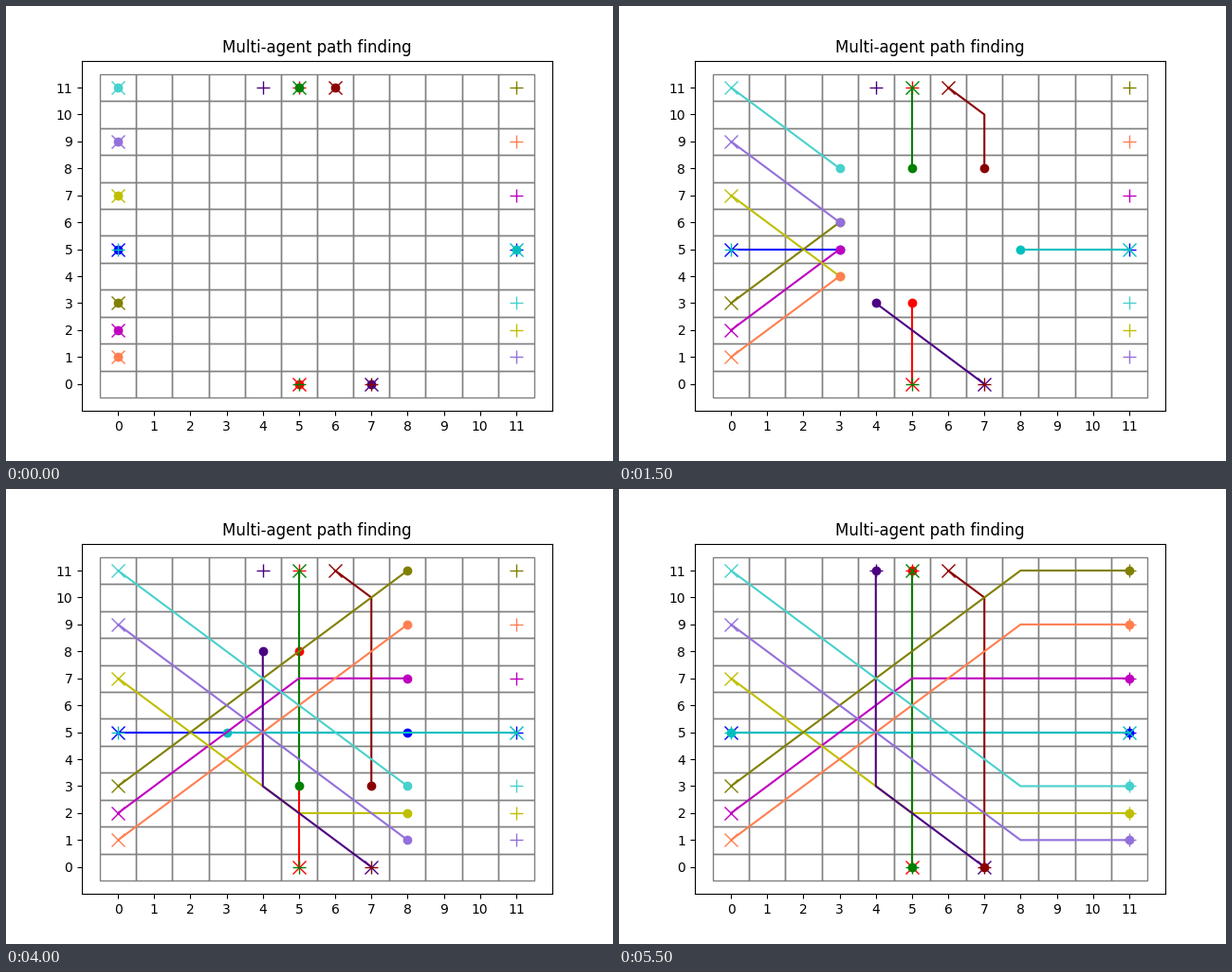
A matplotlib script that plays this animation: 640x480 px, repeating every 10 s.

```python
import numpy as np
import matplotlib.pyplot as plt
from matplotlib.animation import FuncAnimation
from matplotlib.patches import Rectangle

SIZE = 12
STEP_MS = 500
FRAMES = 20

# colour, start cell, goal cell; later agents are drawn on top
AGENTS = [
    ("b", (0, 5), (11, 5)),
    ("r", (5, 0), (5, 11)),
    ("g", (5, 11), (5, 0)),
    ("c", (11, 5), (0, 5)),
    ("m", (0, 2), (11, 7)),
    ("y", (0, 7), (11, 2)),
    ("indigo", (7, 0), (4, 11)),
    ("darkred", (6, 11), (7, 0)),
    ("olive", (0, 3), (11, 11)),
    ("coral", (0, 1), (11, 9)),
    ("mediumpurple", (0, 9), (11, 1)),
    ("mediumturquoise", (0, 11), (11, 3)),
]


def route(start, goal):
    """Walk diagonally until one axis is aligned, then straight on."""
    start, goal = np.array(start), np.array(goal)
    delta = goal - start
    steps = np.arange(SIZE)[:, None]
    return start + np.sign(delta) * np.minimum(steps, np.abs(delta))


plt.rcParams["font.family"] = "DejaVu Sans"
fig, ax = plt.subplots(figsize=(6.4, 4.8), dpi=100)
ax.set_title("Multi-agent path finding")
ax.set_xlim(-1, SIZE)
ax.set_ylim(-1, SIZE)
ax.set_xticks(range(SIZE))
ax.set_yticks(range(SIZE))

for x in range(SIZE):
    for y in range(SIZE):
        ax.add_patch(Rectangle((x - 0.5, y - 0.5), 1, 1,
                               facecolor="none", edgecolor="gray"))

movers = []
for color, start, goal in AGENTS:
    trail, = ax.plot([], [], "-", color=color)
    ax.plot(*start, "x", color=color, markersize=10)
    ax.plot(*goal, "+", color=color, markersize=10)
    dot, = ax.plot([], [], "o", color=color)
    movers.append((route(start, goal), trail, dot))


def update(frame):
    step = min(frame, SIZE - 1)
    artists = []
    for path, trail, dot in movers:
        trail.set_data(path[:step + 1, 0], path[:step + 1, 1])
        dot.set_data(path[step:step + 1, 0], path[step:step + 1, 1])
        artists += [trail, dot]
    return artists


anim = FuncAnimation(fig, update, frames=FRAMES, interval=STEP_MS,
                     repeat=True, repeat_delay=0, blit=False)
plt.show()
```
